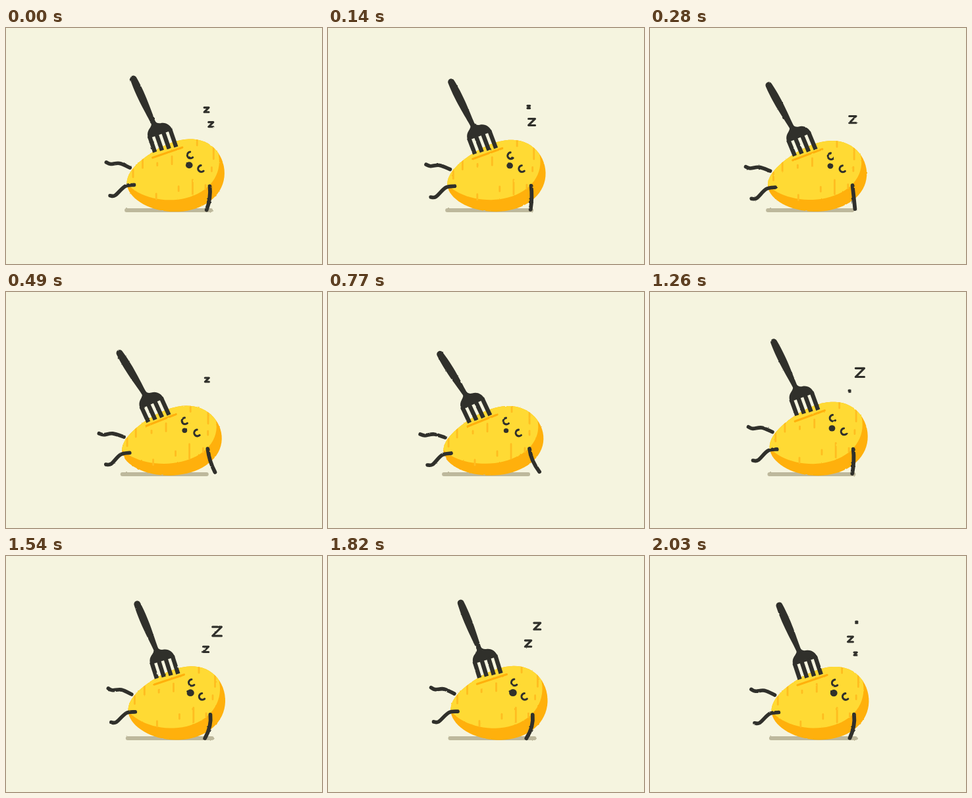
Write an HTML page with a canvas that moves like this. It is 480 by 360 pixels and loops after 2100 ms.

```html
<!DOCTYPE html>
<html lang="en">
<head>
<meta charset="utf-8">
<title>Sleeping potato</title>
<style>
  html, body { margin: 0; width: 100%; height: 100%; overflow: hidden; background: #f5f4df; }
  canvas { display: block; width: 480px; height: 360px; filter: url(#rough); }
  svg { position: absolute; width: 0; height: 0; }
</style>
</head>
<body>
<svg aria-hidden="true">
  <filter id="rough" x="0" y="0" width="100%" height="100%" color-interpolation-filters="sRGB">
    <feTurbulence type="fractalNoise" baseFrequency="0.22" numOctaves="1" seed="4"/>
    <feColorMatrix values="1 0 0 0 0  0 1 0 0 0  0 0 1 0 0  0 0 0 0 1" result="noise"/>
    <feDisplacementMap in="SourceGraphic" in2="noise" scale="2.2" xChannelSelector="R" yChannelSelector="G"/>
    <feGaussianBlur stdDeviation="0.4"/>
  </filter>
</svg>
<canvas id="stage" width="480" height="360"></canvas>
<script>
const ctx = document.getElementById('stage').getContext('2d');
const LOOP = 2100, STEP = 70, TAU = Math.PI * 2;
const INK = '#30302b', YELLOW = '#ffda34', ORANGE = '#ffb00c', MARK = '#ffbd20', SHADOW = '#bdb89c';

// Positions are given for the fully exhaled pose.
const MARKS = [
  [196, 203, 20], [220, 211, 6], [242, 200, 14], [278, 231, 24], [257, 242, 9], [223, 255, 10],
  [299, 237, 8], [306, 183, 19], [306, 211, 8], [279, 174, 10], [183, 223, 14]
];
const LEGS = [
  [[178, 222], [161, 217], [147, 219], [140, 217]],
  [[187, 246], [173, 249], [159, 263], [151, 264]]
];
const EYES = [[271, 197], [290, 215]];
const SNORES = [
  { born: 800, life: 1270, x: 308, y: 136, drift: 5, bow: 10, rise: 36, size: 17 },
  { born: 1200, life: 1150, x: 303, y: 153, drift: 2, bow: 0, rise: 36, size: 12.5 },
  { born: 1960, life: 740, x: 313, y: 151, drift: -9, bow: 0, rise: 20, size: 13.5 }
];

const mix = (a, b, k) => a + (b - a) * k;

function path(pts) {
  ctx.beginPath();
  for (const p of pts) ctx.lineTo(...p);
}

// Smooth open curve through the points.
function trace(pts) {
  const at = i => pts[Math.max(0, Math.min(pts.length - 1, i))];
  ctx.beginPath();
  ctx.moveTo(...pts[0]);
  for (let i = 0; i < pts.length - 1; i++) {
    const [a, b, c, d] = [at(i - 1), at(i), at(i + 1), at(i + 2)];
    ctx.bezierCurveTo(
      b[0] + (c[0] - a[0]) / 6, b[1] + (c[1] - a[1]) / 6,
      c[0] - (d[0] - b[0]) / 6, c[1] - (d[1] - b[1]) / 6, c[0], c[1]);
  }
}

function fill(color) {
  ctx.fillStyle = color;
  ctx.fill();
}

function stroke(color, width) {
  ctx.strokeStyle = color;
  ctx.lineWidth = width;
  ctx.stroke();
}

function line(a, b, color, width) {
  path([a, b]);
  stroke(color, width);
}

// Tilted egg, fuller at the head end and along the top.
function potato(pose) {
  const cos = Math.cos(.21), sin = Math.sin(.21);
  return Array.from({ length: 72 }, (_, i) => {
    const c = Math.cos(i / 72 * TAU), s = Math.sin(i / 72 * TAU);
    const along = 77 * c, across = 50 * s * (1 + (.2 - .07 * s) * c);
    return pose([251 + along * cos + across * sin, 230 - along * sin + across * cos]);
  });
}

function drawBody(pose) {
  const skin = potato(pose);
  ctx.save();
  path(skin);
  fill(ORANGE);
  ctx.clip();
  path(skin.map(([x, y]) => [x - 8, y - 18]));
  fill(YELLOW);
  for (const [mx, my, len] of MARKS) {
    const [x, y] = pose([mx, my]);
    line([x, y + 1], [x, y + len - 1], MARK, 2.8);
  }
  ctx.restore();
  line(pose([212, 205]), pose([257, 187]), ORANGE, 3.2);
}

function drawFork(pose) {
  const top = pose([170, 95]), neck = pose([209, 157]);
  const dx = neck[0] - top[0], dy = neck[1] - top[1];
  const len = Math.hypot(dx, dy), lean = -Math.atan2(dx, dy);

  ctx.save();
  ctx.translate(...neck);
  ctx.rotate(lean);
  ctx.beginPath();
  ctx.moveTo(-3.5, 5);
  ctx.bezierCurveTo(-3.5, -15, -8, -len * .55, -5, -len);
  ctx.arc(0, -len, 5, Math.PI, 0);
  ctx.bezierCurveTo(8, -len * .55, 3.5, -15, 3.5, 5);
  fill(INK);
  ctx.restore();

  // The head leans less than the handle.
  ctx.save();
  ctx.translate(...neck);
  ctx.rotate(lean * .78);
  ctx.translate(4, 0);
  ctx.beginPath();
  ctx.moveTo(-7, -4);
  ctx.bezierCurveTo(-8, 5, -17, 3, -19, 15);
  ctx.lineTo(-19.7, 18);
  ctx.lineTo(19.7, 18);
  ctx.bezierCurveTo(19, 9, 14, 3, 6, 2);
  ctx.quadraticCurveTo(0, 1, -1, -4);
  fill(INK);
  ctx.lineCap = 'butt';
  for (let i = 0; i < 4; i++) {
    const x = -16.5 + i * 11;
    line([x, 15], [x, 41 + i], INK, 6.4);
  }
  ctx.restore();
}

function drawArm(pose, breath) {
  const reach = Math.max(0, breath) ** .6;
  const hand = [322 - 20 * reach, 274 + 4 * reach];
  const [x, y] = pose([306, 239]);
  ctx.beginPath();
  ctx.moveTo(x, y);
  ctx.quadraticCurveTo(x + 2, y + 18, ...hand);
  stroke(INK, 5.8);
}

function drawFace(pose, breath) {
  for (const eye of EYES) {
    const [x, y] = pose(eye);
    ctx.beginPath();
    ctx.arc(x, y, 4.9, .8, 4.6);
    stroke(INK, 3.1);
  }
  const [x, y] = pose([270.5, 211.5]), r = mix(3.7, 5.7, breath);
  ctx.beginPath();
  ctx.ellipse(x, y, r, r * .95, 0, 0, TAU);
  fill(INK);
}

function drawSnore(snore, t) {
  const k = (t - snore.born) / snore.life;
  if (k <= 0 || k >= 1) return;
  const arc = Math.sin(Math.PI * k);
  const x = snore.x + snore.drift * k + snore.bow * arc, y = snore.y - snore.rise * k;
  const r = Math.max(.6, (snore.size * Math.sqrt(arc) - 3) / 2);
  path([[x - r, y - r], [x + r, y - r], [x - r, y + r], [x + r, y + r]]);
  stroke(INK, 3.1);
}

function draw(t) {
  const breath = .53 - .54 * Math.cos((t - 690) / LOOP * TAU);
  const stretch = t > 770 && t < 1540 ? .032 * Math.sin((t - 770) / 770 * Math.PI) ** 2 : 0;

  // Breathing in tips everything upright; a short stretch lifts it off the ground line.
  const pose = ([x, y]) => {
    const py = y + breath * (.1 * x + .08 * y - 46.8);
    return [x + breath * (50.9 - .05 * x - .13 * y), py - stretch * (281 - py)];
  };

  ctx.clearRect(0, 0, 480, 360);
  ctx.lineCap = ctx.lineJoin = 'round';
  const slide = 9 * breath;
  line([176 + slide, 278], [304 + slide, 278], SHADOW, 6);
  drawBody(pose);
  drawFork(pose);
  for (const leg of LEGS) {
    trace(leg.map(pose));
    stroke(INK, 5.6);
  }
  drawArm(pose, breath);
  drawFace(pose, breath);
  for (const snore of SNORES) {
    drawSnore(snore, t);
    drawSnore(snore, t + LOOP);
  }
}

const start = performance.now();
function tick() {
  const t = (performance.now() - start) % LOOP;
  draw(Math.floor(t / STEP) * STEP);
  requestAnimationFrame(tick);
}
tick();
</script>
</body>
</html>
```
